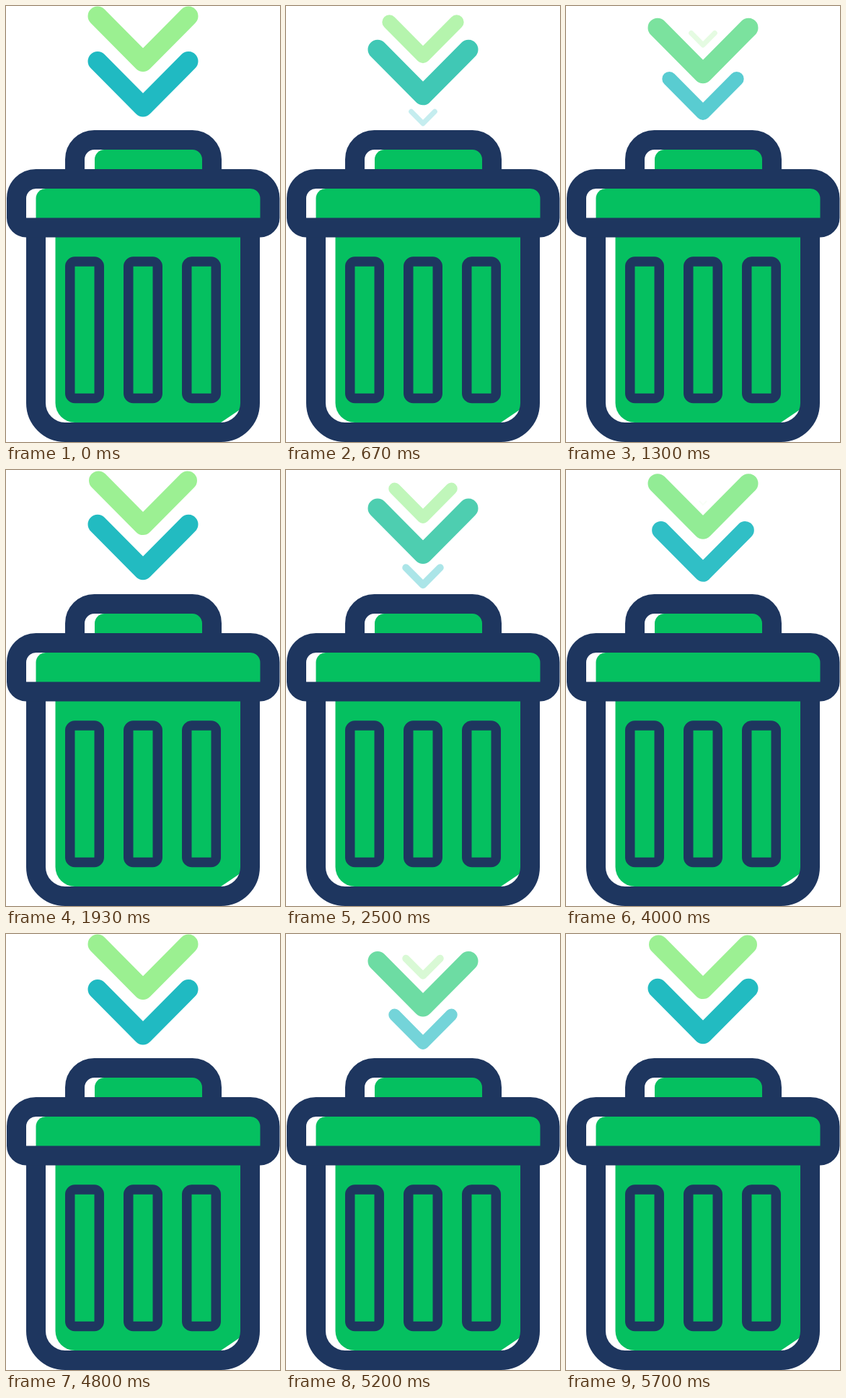
An HTML page for the animation above (5.73 s loop, 380 by 604 pixels).

```html
<!DOCTYPE html>
<html lang="en">
<head>
<meta charset="utf-8">
<title>Trash bin</title>
<style>
  html, body { margin: 0; height: 100%; overflow: hidden; background: #fff; }
  svg { display: block; width: 100%; height: 100%; }
  .line { fill: none; stroke: #1e365f; stroke-width: 27; stroke-linejoin: round; }
  .slot { stroke-width: 13.5; }
  .fill { fill: #05c060; }
  .chevron { fill: none; stroke-width: 27; stroke-linecap: round; stroke-linejoin: round; }
</style>
</head>
<body>
<svg viewBox="0 0 380 604">
  <g class="fill">
    <path d="M123 239V212.5a13.5 13.5 0 0 1 13.5-13.5H272l13 14V239Z"/>
    <path d="M41.5 307V266.5a13.5 13.5 0 0 1 13.5-13.5H352l14 14V307Z"/>
    <path d="M68.5 307V550a27 27 0 0 0 27 27H298l40-27V307Z"/>
  </g>
  <g class="line">
    <path d="M95.5 239.5V212.5a27 27 0 0 1 27-27H258.5a27 27 0 0 1 27 27V239.5"/>
    <path d="M41.5 307V550a40.5 40.5 0 0 0 40.5 40.5H298a40.5 40.5 0 0 0 40.5-40.5V307"/>
    <path d="M14.5 266.5a27 27 0 0 1 27-27H339a27 27 0 0 1 27 27V293.5a13.5 13.5 0 0 1-13.5 13.5H28a13.5 13.5 0 0 1-13.5-13.5Z"/>
    <g class="slot">
      <rect x="88.75" y="354" width="40.5" height="189.5" rx="6.75"/>
      <rect x="169.75" y="354" width="40.5" height="189.5" rx="6.75"/>
      <rect x="250.75" y="354" width="40.5" height="189.5" rx="6.75"/>
    </g>
  </g>
  <g class="chevron">
    <path d="M-63-31.75L0 31.75L63-31.75"/>
    <path d="M-63-31.75L0 31.75L63-31.75"/>
    <path d="M-63-31.75L0 31.75L63-31.75"/>
  </g>
</svg>
<script>
  const LOOP = 5730, STEPS_PER_CYCLE = 12, PITCH = 62.5;
  const LIME = [155, 240, 145], TEAL = [32, 186, 194];
  const [entering, falling, leaving] = document.querySelectorAll('.chevron path');

  const mix = (a, b, k) => `rgb(${a.map((v, i) => v + (b[i] - v) * k)})`;

  function place(chevron, drop, size, color) {
    chevron.setAttribute('transform', `translate(190 ${45.75 + drop * PITCH}) scale(${size})`);
    chevron.setAttribute('stroke', color);
    chevron.setAttribute('opacity', size);
  }

  function draw(now) {
    // 12.5 poses per second, shown on a 30 Hz clock
    const tick = Math.floor((now % LOOP) * 3 / 100);
    const step = Math.floor(tick * 5 / 12);
    const p = step % STEPS_PER_CYCLE / STEPS_PER_CYCLE;
    const e = p * p * (3 - 2 * p);

    place(entering, 0, e, mix(LIME, TEAL, 0));
    place(falling, e, 1, mix(LIME, TEAL, e));
    place(leaving, 1 + e, 1 - e, mix(LIME, TEAL, 1));
    requestAnimationFrame(draw);
  }
  draw(performance.now());
</script>
</body>
</html>
```
